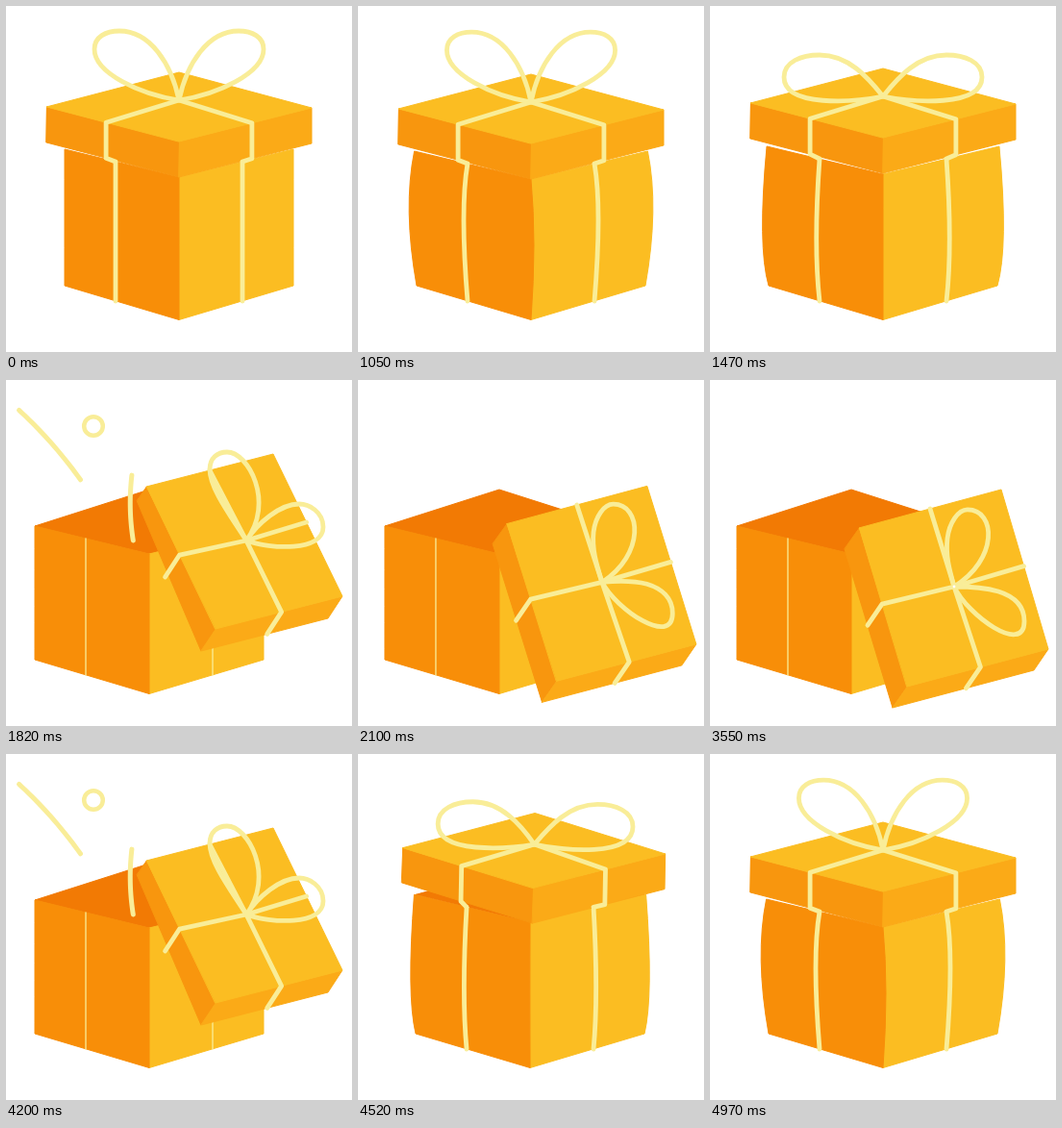
Animation, 360 px wide and 360 px high, one loop 5000 ms. Source, as an HTML page with a canvas:

```html
<!DOCTYPE html>
<html lang="en">
<head>
<meta charset="utf-8">
<title>Gift box</title>
<style>
  html, body { margin: 0; width: 100%; height: 100%; overflow: hidden; background: #fff; }
  canvas { display: block; width: 360px; height: 360px; }
</style>
</head>
<body>
<canvas id="stage"></canvas>
<script>
const SIZE = 360, LOOP = 5000, STEP = 25, LAST = 60;
const CREAM = '#f9ed98', GOLD = '#fbbd22', ORANGE = '#f88e08', INSIDE = '#f27a04';
const LID_LEFT = '#f8960e', LID_RIGHT = '#fbaa17';

const canvas = document.getElementById('stage');
const ctx = canvas.getContext('2d');
const dpr = window.devicePixelRatio || 1;
canvas.width = canvas.height = SIZE * dpr;
ctx.scale(dpr, dpr);
ctx.lineCap = ctx.lineJoin = 'round';

const mix = (a, b, k) => a.map((v, i) => v + (b[i] - v) * k);
const lerp2 = (p, q, k) => [p[0] + (q[0] - p[0]) * k, p[1] + (q[1] - p[1]) * k];

// Smooth curve through keys [step, values], at rest on both ends.
function track(keys, n) {
  const end = keys.length - 1;
  if (n <= keys[0][0]) return keys[0][1];
  if (n >= keys[end][0]) return keys[end][1];
  const i = keys.findIndex(k => k[0] > n) - 1;
  const [t0, a] = keys[i], [t1, b] = keys[i + 1];
  const d = t1 - t0, x = (n - t0) / d, x2 = x * x, x3 = x2 * x;
  const slope = (j, c) => j === 0 || j === end ? 0 :
    (keys[j + 1][1][c] - keys[j - 1][1][c]) / (keys[j + 1][0] - keys[j - 1][0]);
  return a.map((v, c) =>
    (2 * x3 - 3 * x2 + 1) * v + (x3 - 2 * x2 + x) * d * slope(i, c) +
    (3 * x2 - 2 * x3) * b[c] + (x3 - x2) * d * slope(i + 1, c));
}

// Straight-line version for simple values.
function ramp(keys, n) {
  if (n <= keys[0][0]) return keys[0][1];
  for (let i = 1; i < keys.length; i++) {
    const [t0, a] = keys[i - 1], [t1, b] = keys[i];
    if (n <= t1) return a + (b - a) * (n - t0) / (t1 - t0);
  }
  return keys[keys.length - 1][1];
}

// Lid: left, back, right, front corners; side offset; knot; left corner depth.
const lidAt = dy => [42, 105 + dy, 180, 69 + dy, 318, 106 + dy, 180, 141 + dy, 0, 37, 180, 98 + dy, 1];
const lidTip = [146, 111, 278, 77, 350, 225, 218, 259, -15, 23, 250, 167, 0.65];
const lidRest = [155, 154, 303, 114, 352, 280, 205, 319, -15, 22, 254, 215, 1];
const lidKeys = [
  [0, lidAt(0)], [2, lidAt(2)], [9, lidAt(8)], [19, lidAt(-4)],
  [26, [95, 74, 230, 36, 338, 138, 205, 178, -8, 32, 222, 106, 0.85]],
  [33, lidTip], [46, mix(lidTip, lidRest, 1.01)],
  [53, mix(lidTip, lidRest, 0.995)], [60, lidRest]
];

// Bow: two loops of three cubics each, relative to the knot.
const mirrored = half => half.concat(half.map((v, i) => i % 2 ? v : -v));
const bowIdle = mirrored([-40, -6, -88, -28, -88, -53, -88, -66, -76, -72, -62, -72, -30, -72, -8, -38]);
const bowFlat = mirrored([-30, 6, -103, 12, -103, -20, -103, -36, -85, -43, -66, -43, -36, -43, -16, -20]);
const bowTip = [
  -18, -28, -38, -55, -38, -74, -38, -86, -30, -92, -20, -92, 2, -92, 30, -40,
  25, 9, 80, 12, 80, -14, 80, -30, 65, -38, 55, -38, 35, -38, 12, -18];
const bowRest = [
  -5, -18, -9, -32, -7, -50, -5, -66, 4, -80, 14, -80, 44, -80, 46, -28,
  14, 30, 73, 72, 73, 36, 73, 20, 62, 10, 46, 5, 32, 1, 14, 0];
const bowKeys = [
  [0, bowIdle], [2, mix(bowIdle, bowFlat, -0.03)], [9, mix(bowIdle, bowFlat, -0.1)],
  [14, mix(bowIdle, bowFlat, 0.35)], [19, bowFlat], [26, mix(bowFlat, bowTip, 0.5)],
  [33, bowTip], [46, mix(bowTip, bowRest, 1.05)], [53, mix(bowTip, bowRest, 0.99)], [60, bowRest]
];

// Body: shift, top offset, side bulge, bulge height, middle edge bend.
const bodyKeys = [
  [0, [0, -3, 0, 210, 0]], [2, [0, -1, 8, 210, 3]], [9, [0, 5, 14, 215, 4]],
  [19, [0, -6, 6.5, 250, 0]], [24, [-9, 0, 0, 250, 0]], [33, [-31, 0, 0, 250, 0]],
  [46, [-33, 0, 0, 250, 0]], [60, [-33, 0, 0, 250, 0]]
];

function poly(color, ...pts) {
  ctx.beginPath();
  pts.forEach(p => ctx.lineTo(p[0], p[1]));
  ctx.closePath();
  paint(color);
}

function paint(color) {
  ctx.fillStyle = ctx.strokeStyle = color;
  ctx.lineWidth = 1;
  ctx.fill();
  ctx.stroke();
}

function line(width, ...pts) {
  ctx.beginPath();
  pts.forEach(p => ctx.lineTo(p[0], p[1]));
  strokeCream(width);
}

function strokeCream(width) {
  ctx.strokeStyle = CREAM;
  ctx.lineWidth = width;
  ctx.stroke();
}

function streak(p, c, q, tail, head) {
  if (head - tail < 0.01) return;
  const pts = [];
  for (let i = 0; i <= 20; i++) {
    const t = tail + (head - tail) * i / 20;
    pts.push(lerp2(lerp2(p, c, t), lerp2(c, q, t), t));
  }
  line(5, ...pts);
}

function drawConfetti(n) {
  if (n < 25) return;
  streak([112, 160], [70, 80], [3, 22],
    ramp([[27, 0], [33, 0.37], [41, 1]], n), ramp([[25, 0], [33, 0.92], [35, 1]], n));
  streak([137, 190], [121, 126], [138, 62],
    ramp([[30, 0], [33, 0.18], [43, 1]], n), ramp([[27, 0], [33, 0.71], [36, 1]], n));
  const [x, y, r] = track([[25, [125, 150, 2]], [33, [91, 48, 9.8]], [45, [84, 26, 0]]], n);
  if (r > 0.5) {
    ctx.beginPath();
    ctx.arc(x, y, r, 0, 7);
    strokeCream(Math.min(4.5, r));
  }
}

function drawBody(n) {
  const [dx, top, bulge, by, bend] = track(bodyKeys, n);
  const cx = 180 + dx, w = 119, side = 152 + top, front = 181 + top;
  if (n > 19) poly(INSIDE, [cx - w, side], [cx, 114], [cx + w, side], [cx, front]);
  drawConfetti(n);

  for (const s of [1, -1]) {
    ctx.beginPath();
    ctx.moveTo(cx, front);
    ctx.lineTo(cx + s * (w + bulge * 0.3), side);
    ctx.quadraticCurveTo(cx + s * (w + bulge * 1.8), by, cx + s * w, 291);
    ctx.lineTo(cx, 326.5);
    ctx.quadraticCurveTo(cx + 2 * bend, 245, cx, front);
    paint(s > 0 ? GOLD : ORANGE);
  }

  const width = ramp([[20, 4.8], [25, 1.3]], n);
  for (const s of [-1, 1]) {
    const x = cx + s * 66;
    ctx.beginPath();
    ctx.moveTo(x, 165 + top);
    ctx.quadraticCurveTo(x + s * bulge, by, x, 307);
    strokeCream(width);
  }
  return { cx, top };
}

function drawBow(n, kx, ky) {
  const b = track(bowKeys, n);
  ctx.beginPath();
  for (const o of [0, 16]) {
    const p = i => [kx + b[o + 2 * i], ky + b[o + 2 * i + 1]];
    ctx.moveTo(kx, ky);
    ctx.bezierCurveTo(...p(0), ...p(1), ...p(2));
    ctx.bezierCurveTo(...p(3), ...p(4), ...p(5));
    ctx.bezierCurveTo(...p(6), ...p(7), kx, ky);
  }
  strokeCream(4.8);
}

function drawLid(n, body) {
  const v = track(lidKeys, n);
  const L = [v[0], v[1]], T = [v[2], v[3]], R = [v[4], v[5]], B = [v[6], v[7]], knot = [v[10], v[11]];
  const down = (p, k = 1) => [p[0] + v[8] * k, p[1] + v[9] * k];
  poly(LID_LEFT, L, B, down(B), down(L, v[12]));
  poly(LID_RIGHT, B, R, down(R), down(B));
  poly(GOLD, L, T, R, B);

  const k = ramp([[19, 0.45], [33, 0.48]], n);
  const a = lerp2(L, B, k), c = lerp2(R, B, k);
  const left = [knot, a, down(a)], right = [knot, c, down(c)];
  if (n < 21) {
    left.push([body.cx - 66, 165 + body.top]);
    right.push([body.cx + 66, 165 + body.top]);
  }
  line(4.8, ...left);
  line(4.8, ...right);

  const grow = ramp([[22, 0], [29, 1]], n);
  if (grow > 0) {
    line(4.8, knot, lerp2(knot, lerp2(T, R, 0.48), grow));
    line(4.8, knot, lerp2(knot, lerp2(L, T, 0.5), grow));
  }
  drawBow(n, ...knot);
  if (n > 58) {
    ctx.beginPath();
    ctx.arc(knot[0], knot[1], 1.4, 0, 7);
    ctx.fillStyle = '#fff';
    ctx.fill();
  }
}

// Opens after one second, rests, then plays backwards.
function stepAt(t) {
  if (t < 1020) return 0;
  if (t < 3550) return Math.min(LAST, Math.floor((t - 1015) / STEP) + 1);
  return Math.max(1, LAST - 1 - Math.floor((t - 3545) / STEP));
}

function frame() {
  const n = stepAt(performance.now() % LOOP);
  ctx.fillStyle = '#fff';
  ctx.fillRect(0, 0, SIZE, SIZE);
  drawLid(n, drawBody(n));
  requestAnimationFrame(frame);
}
frame();
</script>
</body>
</html>
```
